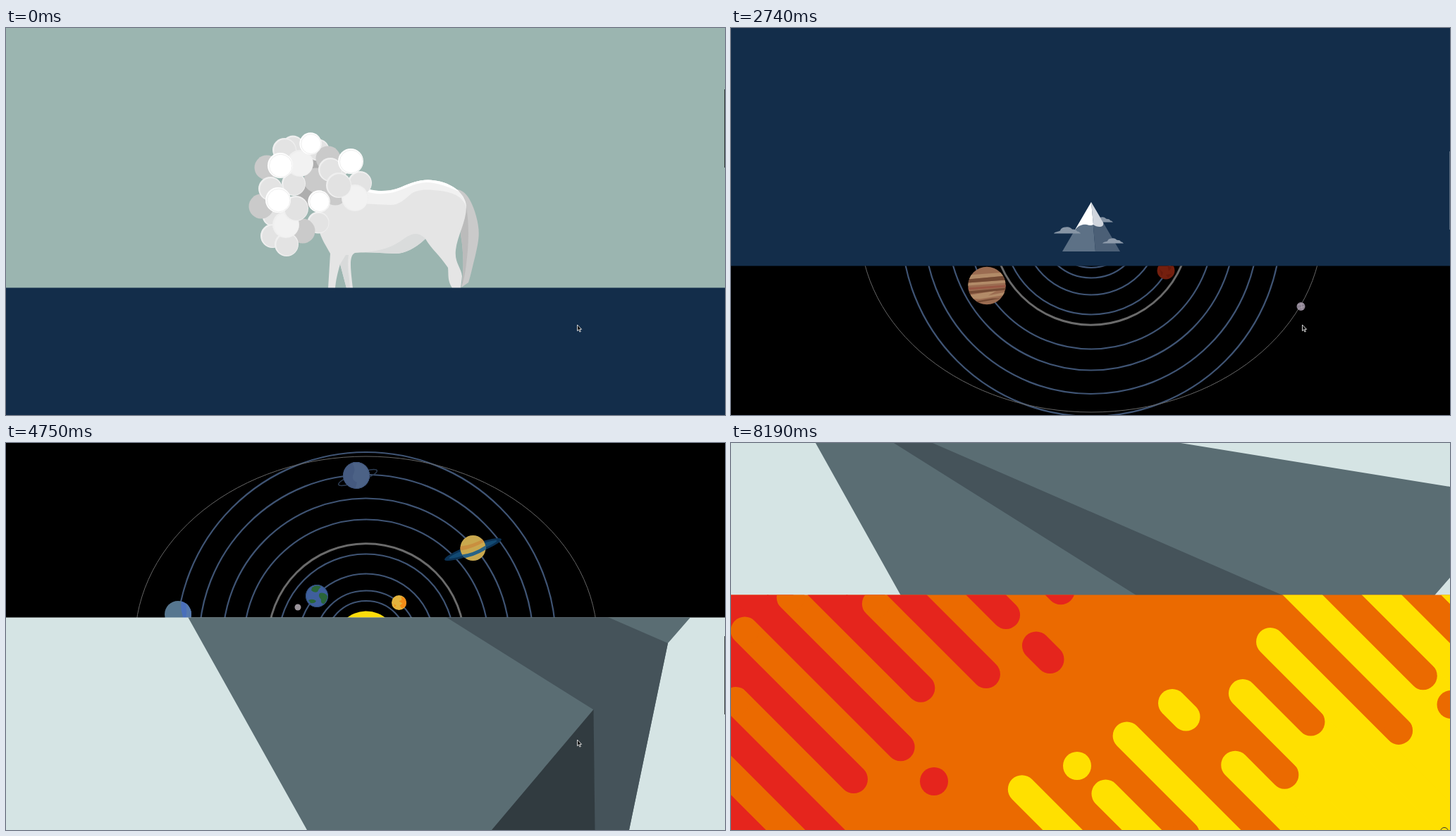
These frames come from a looping animation (1020x549 px, 8300 ms). An HTML page:

```html
<!DOCTYPE html>
<html lang="en">
<head>
<meta charset="utf-8">
<title>Parallax scroll</title>
<style>
html, body { margin: 0; width: 100%; height: 100%; overflow: hidden; background: #9bb5b0; }
svg { display: block; width: 100%; height: 100%; }
</style>
</head>
<body>
<svg id="stage" viewBox="0 0 1020 549" xmlns="http://www.w3.org/2000/svg"></svg>
<script>
const LOOP = 8300;
const SECTION = 397;
const FIRST_EDGE = 794.6;
const BEAT = 120;

const path = (d, fill, extra = '') => `<path d="${d}" fill="${fill}" ${extra}/>`;
const disc = (x, y, r, fill, extra = '') => `<circle cx="${x}" cy="${y}" r="${r}" fill="${fill}" ${extra}/>`;
const ring = (x, y, r, stroke, w) => disc(x, y, r, 'none', `stroke="${stroke}" stroke-width="${w}"`);
const oval = (rx, ry, style) => `<ellipse rx="${rx}" ry="${ry}" ${style}/>`;
const fillAll = color => `<rect width="1020" height="549" fill="${color}"/>`;

function ball(x, y, r, grey) {
  const fill = `rgb(${grey},${grey},${grey})`;
  if (grey < 210) return disc(x, y, r, fill);
  const white = grey === 255;
  return disc(x, y, r, white ? '#fff' : '#efefef')
    + disc(x + .7, y + .5, r - 1.7, fill, white ? 'stroke="#e6e6e6" stroke-width=".7"' : '');
}

function horse() {
  const tail = path('M638 229C652 229 661 245 667 267C673 289 671 300 666 322C661 342 659 352 656 361L646 368C650 345 649 315 645 293L652 250Z', '#cacaca')
    + path('M650 240C656 262 657 290 655 315C653 338 651 354 646 368C650 345 649 315 645 293Z', '#bbb');
  const belly = 'C580 313 566 320 552 320C530 319 512 317 495 319';
  const back = 'C525 233 545 232 560 226C580 217 595 212 617 218C638 224 653 238 653 254';
  const body = path(`M440 235L505 227${back}C653 275 640 295 638 315C636 333 646 340 647 352L645 369H633C626 358 628 350 627 340C615 322 603 313 595 299${belly}C486 323 489 342 492 369H483L474 335C470 349 468 358 467 369H457L460 320C454 309 448 300 445 290Z`, '#e5e5e5');
  const shade = path(`M595 299${belly}C525 318 548 312 563 300C575 291 585 288 595 299Z`, '#dadcdc')
    + path('M474 335L482 322H486C483 340 488 356 488 369H483Z', '#d8dada');
  const light = path(`M500 228${back}C648 240 637 234 617 231C600 229 585 228 575 235C565 243 559 251 545 251L500 249Z`, '#f1f1f1')
    + path('M512 228C535 234 548 231 560 226C580 217 595 212 617 218C628 221 637 226 643 232C629 226 612 219 596 219C578 220 565 229 550 233C536 236 522 236 512 232Z', '#fff');
  // Layers of the mane, back to front: grey level, radius, centres.
  const mane = [
    [174, 17, '441,193 430,237'],
    [227, 15.5, '407,168 443,173 473,195 443,276 379,266'],
    [202, 17.5, '457,185 370,198 440,216 467,234 362,253 421,288'],
    [227, 17, '395,173 375,228 408,221 460,201 502,220 378,295 398,307'],
    [242, 19, '417,192 495,241 397,279'],
    [226, 18, '472,223 411,256'],
    [255, 18, '489,189 389,195 386,244'],
    [255, 15.7, '432,164 444,246']
  ].map(([grey, r, centres]) => centres.split(' ').map(c => ball(...c.split(',').map(Number), r, grey)).join(''));
  return fillAll('#9bb5b0') + tail + body + shade + light + mane.join('');
}

function mountain() {
  const cloud = (x, y, s, fill) => path('M0 0C2 -3 6 -2 9 -4C10 -8 14 -9 17 -9C21 -10 24 -8 26 -6C30 -6 32 -5 33 -3C36 -3 37 -1 38 0Z', fill, `transform="translate(${x} ${y}) scale(${s})"`);
  return fillAll('#132d4a')
    + cloud(512, 275.5, .79, '#8593a4')
    + path('M511 247L470 317H517Z', '#5d7186')
    + path('M511 247L517 317H552Z', '#4b5f76')
    + path('M511 247L487 288C492 280 499 278 505 279Q510 281 514 279Z', '#fff')
    + path('M511 247L514 279C519 283 530 284 528 276Z', '#d0d5dd')
    + cloud(458, 291.5, 1, '#8795a5')
    + cloud(527, 305.5, .79, '#8e9bab');
}

function planets() {
  const cx = 511, cy = 282;
  const planet = (id, x, y, r, fill, marks) =>
    `<clipPath id="${id}">${disc(0, 0, r, '#000')}</clipPath><g transform="translate(${x} ${y})">${disc(0, 0, r, fill)}<g clip-path="url(#${id})">${marks}</g></g>`;
  const tilted = (x, y, content) => `<g transform="translate(${x} ${y}) rotate(-20)">${content}</g>`;
  const orbits = [58, 72.5, 96.5, 124.5, 173.5, 203.5, 237, 269].map(r => ring(cx, cy, r, '#3f5474', 2.2)).join('');
  return fillAll('#000') + orbits
    + ring(cx, cy, 139.3, '#666', 3) + ring(cx, cy, 139.3, '#747474', .8)
    + `<g transform="translate(${cx} ${cy})">${oval(328, 263, 'fill="none" stroke="#666"')}</g>`
    + disc(cx, cy, 43.5, '#fcdc0c')
    + path('M480 267C490 270 505 270 520 269C515 276 517 280 505 286C495 290 485 289 474 291C483 284 494 283 494 277C492 272 486 271 480 267Z', '#fbae0a')
    + path('M509 288C525 289 537 284 546 279C541 289 523 292 509 288Z', '#fba40c')
    + path('M487 301C500 303 520 299 538 301C531 306 521 305 517 310C516 316 510 319 506 315C499 312 502 309 487 309L497 305Z', '#fbae0a')
    + planet('mercury', 567.5, 271.5, 8.5, '#7d1a08', path('M-8 -4L-2 -7L0 -2L-4 1ZM2 -7L8 -3L4 0ZM-6 3L0 1L2 7L-3 8ZM4 2L8 1L6 6Z', '#f0481c'))
    + planet('venus', 557.5, 226.5, 10.5, '#e4b43d', path('M3 -9L11 -5V5L4 8L1 4L5 1L0 -2L4 -4ZM-7 2L-4 4L-6 6Z', '#f28c18'))
    + planet('earth', 441, 217, 16, '#3f5f9d', path('M-7 -12Q0 -17 6 -13Q2 -10 1 -6Q-4 -4 -8 -8ZM4 -4Q12 -6 16 2L11 11Q5 12 6 5Q1 1 4 -4ZM-12 6Q-6 3 -1 7Q-3 11 -9 10Z', '#2a6538') + ring(0, 0, 15.5, '#30507c', 1))
    + disc(414, 233, 4.5, '#9a939a')
    + planet('mars', 617, 344, 12.5, '#741f0e', path('M-9 -2L-4 3L-6 8ZM2 -8L8 -4L4 1ZM0 6L8 5L3 10Z', '#67190b'))
    + planet('jupiter', 363, 365.5, 26.7, '#9b6c51',
      path('M-27 -15L27 -19V-14L-27 -9ZM-27 -4L27 -8V-4L-27 0ZM-27 14L-4 10L16 6L2 14L27 9V13L-10 19L-27 18Z', '#b28b68')
      + path('M-27 -9L27 -14V-8L-27 -4ZM-27 8L27 3V6L-27 12ZM-15 22L8 18L20 18L-12 24Z', '#744a34')
      + path('M-27 3L27 -1V2L-27 6Z', '#985744'))
    + tilted(662.5, 151, oval(43, 7, 'fill="#0a3154"') + oval(36, 4, 'fill="#124a74"'))
    + planet('saturn', 662.5, 149, 18, '#c9a84e', path('M-20 -2Q0 -4 18 -15V-10Q0 1 -20 4Z', '#c98f3f') + path('M-20 10Q0 9 20 -5V1Q0 14 -20 15Z', '#286387'))
    + tilted(499, 49, oval(29, 6, 'fill="none" stroke="#2c3c53" stroke-width="1.5"'))
    + planet('uranus', 497, 46, 19, '#455a80', path('M-7 -19Q0 -10 -4 -2Q-8 6 1 10L-2 20L20 18V-20Z', '#4c6286') + ring(0, 0, 18.5, '#3e547b', 1))
    + planet('neptune', 244, 243, 19, '#56768f', path('M5 -20Q3 -9 6 0T4 20H20V-20Z', '#4a6fbb') + path('M10 -20Q15 0 8 20H20V-20Z', '#5679ad'))
    + planet('pluto', 808.5, 395, 6, '#8b8190', path('M-5 -2L4 -4M-4 3L5 0M0 -5L2 5', 'none', 'stroke="#b1a7b4" stroke-width=".8"'));
}

function crystal() {
  return fillAll('#d5e4e4')
    + path('M120 0H638L1020 62V191L939 284L884 549H427Z', '#5a6d73')
    + path('M231 0H286L939 284L884 549H835L833 378Z', '#45535a')
    + path('M833.5 378L835.5 549H689Z', '#313b40');
}

function stripes() {
  const orange = '#eb6a00', red = '#e5251d', yellow = '#ffe000';
  // Diagonal lanes: lane k holds x - y = -303 + 56.15k; "along" is x + y.
  const at = (k, along) => {
    const across = -303 + 56.15 * k;
    return [(along + across) / 2, (along - across) / 2];
  };
  const bar = ([x, y], len, color, cap = 'round', w = 40) =>
    path(`M${x} ${y}l${len} ${len}`, 'none', `stroke="${color}" stroke-width="${w}" stroke-linecap="${cap}"`);
  const lanes = (first, ends, draw) => ends.map((v, i) => draw(at(first + 2 * i, v))).join('');
  const bars = (first, ends, len, color) => lanes(first, ends, p => bar(p, len, color));
  // A notch is a coloured lane closed by a round orange end.
  const notches = (first, ends, len, color) => lanes(first, ends, p => bar(p, len, color, 'butt', 42) + disc(...p, 20, orange));
  return fillAll(orange)
    + notches(-1, [373, 286, 304, 434], -600, red)
    + bars(-4, [800, 800, 651, 672, 617, 690, 634, 677], -700, red)
    + notches(7, [1199, 1500, 1256, 1218, 1355, 1312, 1376], 700, yellow)
    + bars(4, [904, 1029, 977, 1172, 1081, 1047, 900, 900, 900], 900, yellow)
    + disc(288, 480, 20, red) + bar([433, 287.5], 19.5, red)
    + disc(491, 458, 20, yellow) + bar([626, 369], 19.5, yellow)
    + disc(1021.5, 371, 20, orange);
}

const scenes = [horse, mountain, planets, crystal, stripes];
const stage = document.getElementById('stage');
stage.innerHTML = scenes.map((draw, i) => i
  ? `<clipPath id="clip${i}"><rect id="edge${i}" width="1020" height="2000"/></clipPath><g clip-path="url(#clip${i})">${draw()}</g>`
  : draw()).join('')
  + '<rect id="thumb" x="1019" width="1" height="111"/>'
  + '<path id="arrow" d="M.5 .5V9.2L2.5 7.4L3.9 10.6L5.3 10L3.9 6.9H6.6Z" fill="#111" stroke="#fff" stroke-width=".8"/>'
  + '<circle id="dot" cx="1012" cy="551" r="5.5" fill="none" stroke="#333"/>';

const el = id => document.getElementById(id);
const edges = scenes.slice(1).map((_, i) => el('edge' + (i + 1)));

// Each flick jumps at its start, then coasts to rest in beats.
const flicks = [
  { start: 0, end: 150, jump: 426, rest: 429 },
  { start: 420, end: 1130, jump: 445, rest: 577 },
  { start: 1610, end: 2540, jump: 600, rest: 795 },
  { start: 2740, end: 3770, jump: 854, rest: 1060 },
  { start: 3950, end: 4990, jump: 1090, rest: 1351 },
  { start: 5340, end: 6380, jump: 1400, rest: 1587 },
  { start: 6580, end: 7580, jump: 1648, rest: 1770 }
];

function scrollAt(t) {
  const { start, end, jump, rest } = flicks.findLast(f => t >= f.start);
  const beats = Math.round((end - start) / BEAT);
  const p = Math.min(1, Math.floor((t - start) / (end - start) * beats + 1e-6) / beats);
  return Math.round(jump + (rest - jump) * (1 - (1 - p) ** 3));
}

function arrowAt(t) {
  if (t < 7467) return [810, 420.5];
  if (t < 7660) return [1012, 390];
  return t < 7750 ? [1012, 540] : [1100, 600];
}

function render(t) {
  const s = scrollAt(t);
  edges.forEach((edge, i) => edge.setAttribute('y', FIRST_EDGE + i * SECTION - s));
  const thumb = el('thumb');
  thumb.setAttribute('y', Math.round(s * .2045));
  thumb.setAttribute('fill', s > 700 && s < 1200 ? 'rgba(255,255,255,.3)' : 'rgba(0,0,0,.7)');
  thumb.setAttribute('visibility', t < 7580 ? 'visible' : 'hidden');
  el('arrow').setAttribute('transform', `translate(${arrowAt(t)})`);
  el('dot').setAttribute('visibility', t >= 8140 ? 'visible' : 'hidden');
}

const begin = performance.now();
function tick() {
  render((performance.now() - begin) % LOOP);
  requestAnimationFrame(tick);
}
tick();
</script>
</body>
</html>
```
